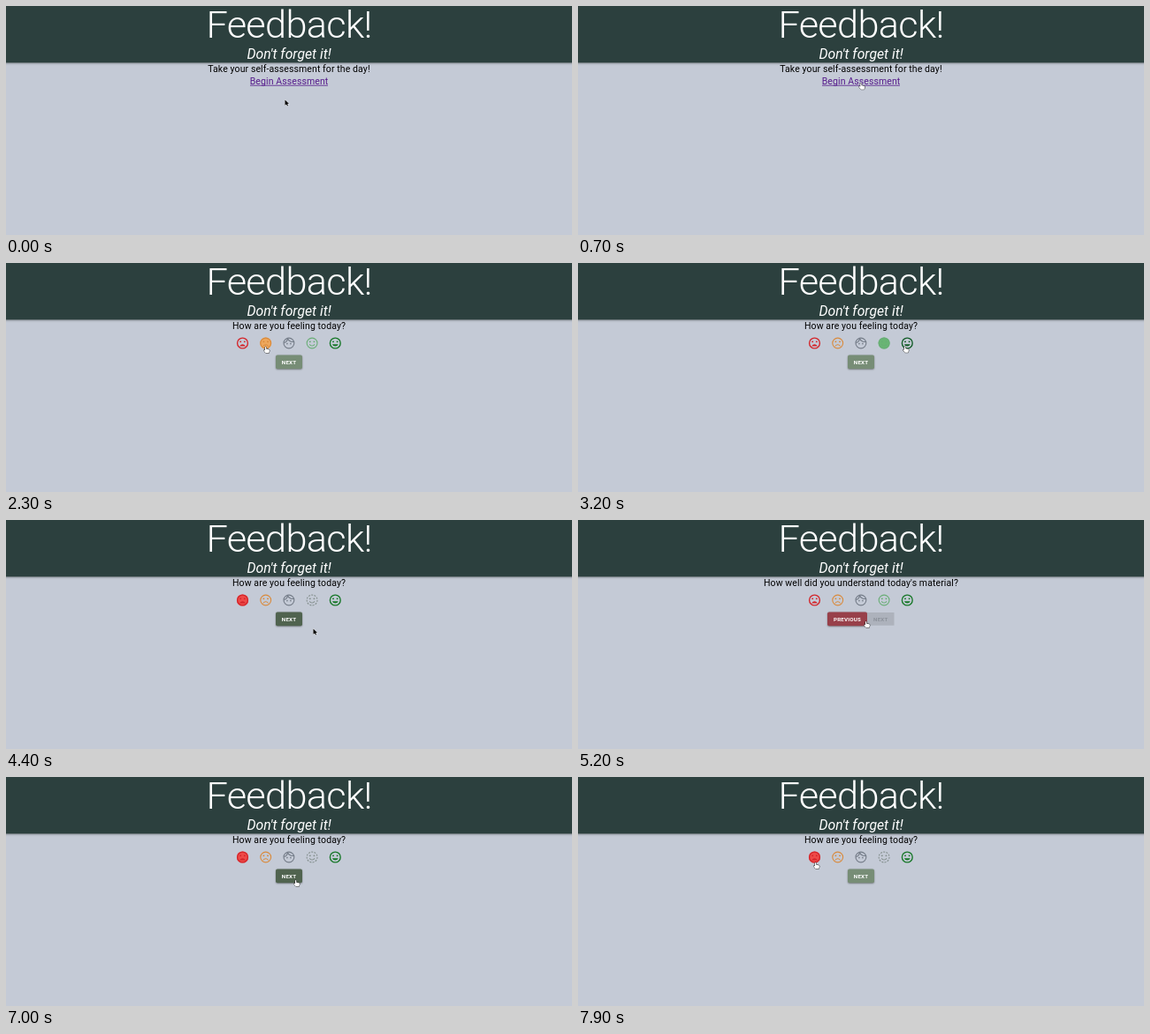
These frames come from a looping animation (640 by 260 pixels, 8 s). An HTML page with a canvas:

```html
<!DOCTYPE html>
<html lang="en">
<head>
<meta charset="utf-8">
<title>Feedback</title>
<style>
html, body { margin: 0; width: 100%; height: 100%; overflow: hidden; background: #c4cad6; }
canvas { display: block; width: 640px; height: 260px; }
</style>
</head>
<body>
<canvas id="stage"></canvas>
<script>
const LOOP = 8000, STEP = 100;
const canvas = document.getElementById('stage');
const ctx = canvas.getContext('2d');
const ratio = window.devicePixelRatio || 1;
canvas.width = 640 * ratio;
canvas.height = 260 * ratio;

const BODY = '10.5px Roboto, sans-serif';
const ICON_Y = 91;
const iconX = i => 267.5 + i * 26.2;
const COLORS = ['#d4262b', '#d98a3c', '#747c88', '#69ae76', '#187829'];
const FILLS = ['#ee4a48', '#eda75c', '#a2a9b3', '#69b574', '#43a047'];
const MOUTHS = [
  'M12 14c-2.3 0-4.3 1.5-5.1 3.5h10.2c-.8-2-2.8-3.5-5.1-3.5z',
  'M12 14c-2.3 0-4.3 1.5-5.1 3.5h1.7c.7-1.2 2-2 3.4-2s2.8.8 3.4 2h1.7c-.8-2-2.8-3.5-5.1-3.5z',
  '',
  'M12 16c-1.5 0-2.8-.8-3.4-2H6.9c.8 2 2.8 3.5 5.1 3.5s4.3-1.5 5.1-3.5h-1.7c-.7 1.2-2 2-3.4 2z',
  'M12 17.5c2.3 0 4.3-1.5 5.1-3.5H6.9c.8 2 2.8 3.5 5.1 3.5z'
].map(d => new Path2D(d));
const HAIR = new Path2D('M3.6 11.5C7 10.5 9 8 10 4.5C12 8.5 15.5 10.3 20.4 9.5');
const ARROW = new Path2D('M0 0V6.2L1.5 4.9L2.5 7L3.5 6.5L2.6 4.6H4.5Z');
const HAND = new Path2D('M0 .5Q.7-.3 1.3.5V2.7L4.2 3.2Q5 3.4 4.9 4.4L4.4 7.2H.7L-1.5 4.4Q-1.5 3.4-.7 3.7L0 4.3Z');

// Pointer tip: time, x, y
const PATH = [
  [0, 315.5, 106.5], [300, 319, 92], [500, 320, 86], [800, 319, 88], [900, 314, 100],
  [1000, 305, 105], [1100, 292, 106], [1200, 292, 106], [1400, 268, 97], [1800, 267, 96],
  [2000, 293, 95], [2300, 293, 95], [2500, 319, 95], [2700, 319, 95], [2900, 345, 95],
  [3100, 346, 95], [3200, 369, 94.5], [3500, 370, 94.5], [3800, 268, 95], [4000, 268, 95],
  [4400, 347.5, 123.5], [4600, 324, 115], [4900, 324, 115], [5200, 325, 115],
  [5500, 370, 95], [5800, 371, 95], [6100, 345, 114], [6200, 334, 114], [6300, 320, 113],
  [6800, 320, 113], [7200, 334, 121], [7600, 318, 114], [7700, 311, 106],
  [7800, 285, 100], [7900, 268, 97], [8000, 268, 97]
];

// Time, page, selected icon
const STATES = [
  [0, 0, -1], [800, 1, -1], [1700, 1, 0], [2200, 1, 1], [2600, 1, 2], [3000, 1, 3],
  [3400, 1, 4], [3900, 1, 0], [4800, 2, -1], [5700, 2, 4], [6500, 1, 0]
];

function pointerAt(t) {
  const i = Math.max(1, PATH.findIndex(p => p[0] > t));
  const [t0, x0, y0] = PATH[i - 1], [t1, x1, y1] = PATH[i];
  const k = (t - t0) / (t1 - t0), e = k * k * (3 - 2 * k);
  return { x: x0 + (x1 - x0) * e, y: y0 + (y1 - y0) * e };
}

function stateAt(t) {
  const [, page, selected] = STATES.filter(s => s[0] <= t).pop();
  return { page, selected };
}

function hoverAt(t) {
  const { x, y } = pointerAt(t), { page, selected } = stateAt(t);
  const inside = (l, top, r, b) => x >= l && x <= r && y >= top && y <= b;
  if (page === 0) return inside(276, 80, 364, 91) ? 'link' : '';
  for (let i = 0; i < 5; i++) {
    if (Math.hypot(x - iconX(i), y - ICON_Y) < 8.5) return 'icon' + i;
  }
  if (page === 2 && inside(282, 104, 327, 121)) return 'previous';
  const left = page === 2 ? 327 : 305;
  return selected >= 0 && inside(left, 104, left + 31, 121) ? 'next' : '';
}

function text(str, y, font, color, spacing = 0.0985, x = 320) {
  ctx.font = font;
  ctx.letterSpacing = spacing + 'px';
  ctx.fillStyle = color;
  ctx.textAlign = 'center';
  ctx.fillText(str, x, y);
}

function shadow(color, blur, y) {
  ctx.shadowColor = color;
  ctx.shadowBlur = blur * ratio;
  ctx.shadowOffsetY = y * ratio;
}

function header() {
  ctx.save();
  shadow('rgba(0,0,0,.55)', 3, 1);
  ctx.fillStyle = '#2c403e';
  ctx.fillRect(-10, -10, 660, 74.3);
  ctx.restore();
  text('Feedback!', 36.3, '300 43.3px Roboto, sans-serif', '#fff', -0.68);
  text("Don't forget it!", 60, 'italic 400 15.75px Roboto, sans-serif', '#fff', 0);
}

function dot(x, y, r) {
  ctx.beginPath();
  ctx.arc(x, y, r, 0, 7);
  ctx.fill();
}

function face(i, selected, hovered, faded) {
  ctx.save();
  ctx.translate(iconX(i), ICON_Y);
  ctx.scale(0.656, 0.656);
  ctx.translate(-12, -12);
  if (selected) {
    ctx.fillStyle = FILLS[i];
    dot(12, 12, 10);
  }
  const color = faded ? '#85908f' : hovered && i === 4 ? '#125c28' : COLORS[i];
  ctx.fillStyle = ctx.strokeStyle = color;
  ctx.lineWidth = i === 0 || i === 4 ? 2.1 : 1.7;
  if (faded) ctx.setLineDash([3, 2]);
  ctx.beginPath();
  ctx.arc(12, 12, 9, 0, Math.PI * 2);
  ctx.stroke();
  if (i === 2) {
    ctx.stroke(HAIR);
    dot(9, 13, 1.25);
    dot(15, 13, 1.25);
  } else {
    dot(8.5, 9.5, 1.5);
    dot(15.5, 9.5, 1.5);
    ctx.fill(MOUTHS[i]);
  }
  ctx.restore();
}

function button(label, x, w, color) {
  ctx.save();
  if (color) shadow('rgba(0,0,0,.4)', 2, 0.8);
  ctx.fillStyle = color || '#adb2bc';
  ctx.beginPath();
  if (color) ctx.roundRect(x, 104.5, w, 15.8, 2);
  else ctx.rect(x, 105, w, 14.7);
  ctx.fill();
  ctx.restore();
  text(label, 114.7, '700 6.2px Roboto, sans-serif', color ? '#fff' : '#8d929b', 0.18, x + w / 2);
}

function pointer({ x, y }, isHand) {
  ctx.save();
  ctx.translate(x, y);
  ctx.lineJoin = 'round';
  const shape = isHand ? HAND : ARROW;
  ctx.lineWidth = isHand ? 1 : 1.1;
  ctx.strokeStyle = isHand ? '#222' : '#e4e7ec';
  ctx.stroke(shape);
  ctx.fillStyle = isHand ? '#fff' : '#000';
  ctx.fill(shape);
  ctx.restore();
}

function draw(t) {
  const { page, selected } = stateAt(t);
  const hover = hoverAt(t), lastHover = hoverAt(Math.max(0, t - STEP));
  ctx.setTransform(ratio, 0, 0, ratio, 0, 0);
  ctx.fillStyle = '#c4cad6';
  ctx.fillRect(0, 0, 640, 260);
  header();
  if (page === 0) {
    text('Take your self-assessment for the day!', 74.8, BODY, '#000');
    text('Begin Assessment', 88.8, BODY, '#551a8b');
    ctx.fillRect(276, 89.8, 88, 0.8);
  } else {
    text(page === 1 ? 'How are you feeling today?' : "How well did you understand today's material?", 74.8, BODY, '#000');
    const faded = page === 1 && t >= 3400;
    for (let i = 0; i < 5; i++) face(i, i === selected, hover === 'icon' + i, faded && i === 3);
    // Button colours trail the pointer by one step
    const next = selected < 0 ? null : lastHover === 'next' ? '#50634f' : '#778d76';
    if (page === 2) button('PREVIOUS', 282, 45, lastHover === 'previous' ? '#98404a' : '#c95560');
    button('NEXT', page === 2 ? 327 : 305, page === 2 ? 30.5 : 30, next);
  }
  pointer(pointerAt(t), hover !== '');
}

function tick(now) {
  draw(Math.floor((now % LOOP) / STEP) * STEP);
  requestAnimationFrame(tick);
}
requestAnimationFrame(tick);
</script>
</body>
</html>
```
